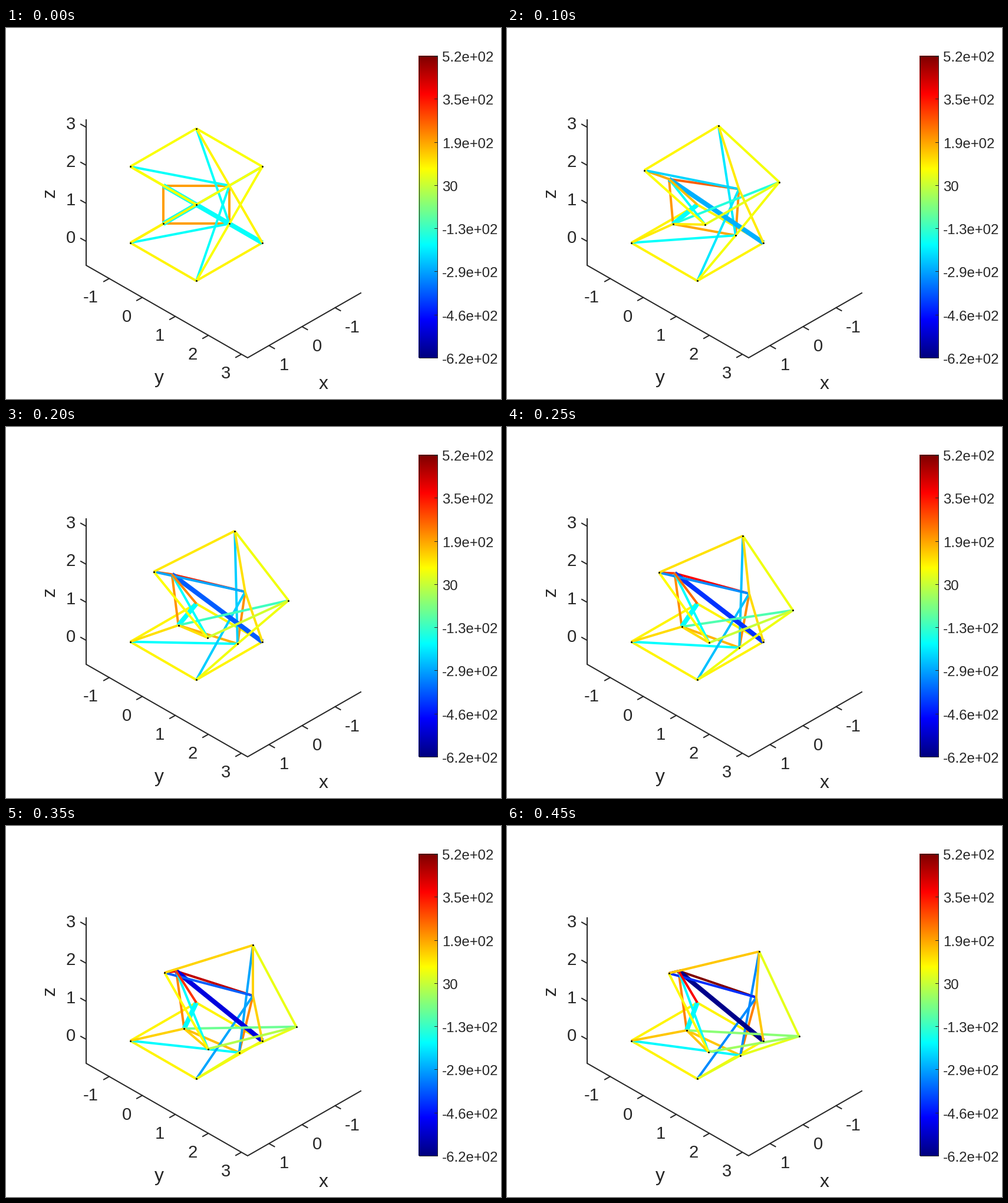
Recreate the animation shown at these times as a matplotlib script. Size 840 px wide and 630 px high, loop 1000 ms.

```python
import numpy as np
import matplotlib.pyplot as plt
from matplotlib.animation import FuncAnimation
from matplotlib.patches import Circle, Ellipse, Polygon, Rectangle, RegularPolygon

W, H, DPI = 840, 630, 100
PX = 72 / DPI
INK = "#262626"
GREY = "#8c8c8c"
STEP_MS, STEPS, LAST = 50, 20, 9
TOOLBAR_STEP = 1

plt.rcParams["font.family"] = "Liberation Sans"
fig = plt.figure(figsize=(W / DPI, H / DPI), dpi=DPI, facecolor="white")
ax = fig.add_axes([0, 0, 1, 1])
ax.axis("off")


def jet(v):
    v = np.asarray(v, float)[..., None]
    return np.clip(1.5 - np.abs(4 * v - np.array([3, 2, 1])), 0, 1)


def iso(x, y, z):
    """Isometric projection to pixels."""
    return np.array([323 + 56 * (y - x), 300 + 32.35 * (x + y + 2 - 2 * z)])


def bezier(start, control, end, q):
    start, control, end = map(np.asarray, (start, control, end))
    return (1 - q) ** 2 * start + 2 * q * (1 - q) * control + q ** 2 * end


def stroke(points, width=2, color=INK, **kw):
    xs, ys = zip(*points)
    return ax.plot(xs, ys, color=color, lw=width * PX, **kw)[0]


def label(x, y, text, size=29.3, ha="center"):
    """Place text so that its capital height is centred on y."""
    ax.text(x, y + 0.358 * size, text, fontsize=size * PX, color=INK,
            ha=ha, va="baseline")


# --- axes of the 3D box -------------------------------------------------
stroke([(136, 156), (136, 403), (410, 560), (602, 450)], solid_joinstyle="miter")
for k in range(4):
    z = 362.3 - 64.6 * k
    stroke([(136, z), (127, z - 5)])
    label(110, z - 7.3, str(k))
for k in range(-1, 4):
    x, y = 231 + 56 * k, 457.7 + 32.2 * k
    stroke([(x, y), (x - 9, y + 5)])
    label(205 + 56 * k - 5 * (k < 0), y + 30.5, str(k))
for k in (-1, 0, 1):
    x, y = 502.5 - 56 * k, 507.2 + 32.2 * k
    stroke([(x, y), (x + 9, y + 5)])
    label(x + 25.5 + 4 * (k < 0), y + 31.5, str(k))
label(539, 602, "x", 32)
label(260, 592, "y", 32)
ax.text(90, 279.5, "z", fontsize=32 * PX, color=INK, rotation=90,
        ha="right", va="center")

# --- colour bar ---------------------------------------------------------
ax.imshow(jet(np.linspace(1, 0, 256))[:, None, :], extent=(700, 732, 560, 47),
          aspect="auto", interpolation="nearest")
ax.set(xlim=(0, W), ylim=(H, 0))
ax.add_patch(Rectangle((700.5, 47.5), 31, 512, fill=False, ec=INK, lw=PX))
bar_labels = ("5.2e+02 3.5e+02 1.9e+02 30 "
              "-1.3e+02 -2.9e+02 -4.6e+02 -6.2e+02").split()
for y, text in zip(np.linspace(47, 560, len(bar_labels)), bar_labels):
    stroke([(727, y), (732, y)], 1)
    label(740, y + 1.4, text, 24, ha="left")

# --- structure ----------------------------------------------------------
BASE = {"A": iso(1, -1, 0), "B": iso(1, 1, 0), "C": iso(-1, 1, 0), "D": iso(-1, -1, 0)}
MIDDLE = {  # start, control point, end
    "E": (iso(0, -1, 1), (279, 248), (291, 246)),
    "F": (iso(-1, 0, 1), (401, 275), (423, 291)),
    "G": (iso(1, 0, 1), (291, 330), (305, 347)),
    "H": (iso(0, 1, 1), (395, 363), (396, 389.5)),
}


def node_positions(p):
    """The top stays a slightly folded parallelogram while it leans over."""
    q = 1 - (1 - p) ** 1.6
    nodes = dict(BASE)
    nodes.update({n: bezier(*path, q) for n, path in MIDDLE.items()})
    centre = bezier(iso(0, 0, 2), (363, 254), (385, 301), q)
    back = bezier((0, -64.6), (15, -103), (43, -85.3), q)
    side = bezier((112, 0), (118, 9.5), (110.5, 53.5), q)
    fold = np.array([0, 2.5 * q])
    nodes.update(T=centre - fold + back, M=centre - fold - back,
                 L=centre + fold - side, R=centre + fold + side)
    return nodes


# Members in drawing order: starting level, then level reached at the end.
YELLOW, ORANGE, CYAN, LIME = 0.635, 0.72, 0.38, 0.62
GROUPS = [
    (YELLOW, {"AB BC CD DA": YELLOW, "EL": 0.97}),
    (ORANGE, {"EF": 1.0, "FH GE": 0.75, "HG": 0.68}),
    (CYAN, {"AH DG": 0.37, "BF TH": 0.26, "CE": 0.01, "LF": 0.17,
            "RG": 0.51, "ME": 0.37}),
    (YELLOW, {"ED": 0.88, "FT FC GA GM": 0.68}),
    (LIME, {"HR HB TR": 0.60, "LT": 0.68, "RM": 0.53, "ML": 0.63}),
]
THICK = ("CE", "DG")
members = []
for start, ends in GROUPS:
    for names, end in ends.items():
        for name in names.split():
            line = stroke([(0, 0), (0, 0)], 8 if name in THICK else 4,
                          solid_capstyle="butt", zorder=3)
            members.append((name, line, start, end))
dots, = ax.plot([], [], "o", color="black", ms=3 * PX, mew=0, zorder=4)


# --- toolbar shown briefly ----------------------------------------------
def make_toolbar():
    parts = []

    def path(*points, width=2):
        parts.append(stroke(points, width, GREY))

    def shape(patch, filled=False):
        patch.set(facecolor=GREY if filled else "none", edgecolor=GREY, linewidth=2 * PX)
        parts.append(ax.add_patch(patch))

    # export
    path((369, 31), (365, 31), (365, 40), (382, 40), (382, 36))
    path((370, 36), (372, 30), (377, 26), (382, 26), width=2.5)
    shape(Polygon([(380, 21), (386, 26), (380, 31)]), True)
    shape(Polygon([(387, 38), (387, 41), (384, 41)]), True)
    # brush
    path((417, 20), (405, 33), width=4.5)
    shape(Ellipse((401, 37), 10, 6, angle=-35), True)
    # data tip
    path((430, 27), (430, 21), (447, 21), (447, 40), (430, 40), (430, 34),
         (426, 30.5), (430, 27))
    for y in (27, 33):
        path((434, y), (444, y))
    # rotate
    shape(Circle((466, 30), 11))
    shape(RegularPolygon((466, 30), 6, radius=6.5))
    for angle in np.radians((90, 210, 330)):
        path((466, 30), (466 + 6 * np.cos(angle), 30 + 6 * np.sin(angle)))
    # pan
    for x, top in ((491, 23), (495, 20), (499, 20), (503, 22)):
        path((x, 32), (x, top), width=2.5)
    path((493, 41), (486, 32), (488, 30), (492, 34))
    path((504, 32), (508, 26), (504, 41), (493, 41))
    # zoom in, zoom out
    for x in (525, 555):
        shape(Circle((x, 28), 8.5))
        path((x + 6, 34), (x + 13, 41), width=3)
        path((x - 4.5, 28), (x + 4.5, 28))
    path((525, 23.5), (525, 32.5))
    # home
    path((575, 31), (587, 20), (599, 31))
    path((579, 29), (579, 41), (584, 41), (584, 33), (590, 33), (590, 41),
         (595, 41), (595, 29))
    return parts


toolbar = make_toolbar()


def draw(frame):
    step = min(frame, LAST)
    p = step / LAST
    nodes = node_positions(p)
    for name, line, start, end in members:
        line.set_data(*zip(nodes[name[0]], nodes[name[1]]))
        line.set_color(jet(start + (end - start) * p))
    dots.set_data(*zip(*(nodes[n] for n in "ABCGHTLRM")))
    for part in toolbar:
        part.set_visible(step == TOOLBAR_STEP)
    return [line for _, line, _, _ in members] + [dots, *toolbar]


anim = FuncAnimation(fig, draw, frames=STEPS, interval=STEP_MS, repeat=True,
                     repeat_delay=0, blit=False)
plt.show()
```
